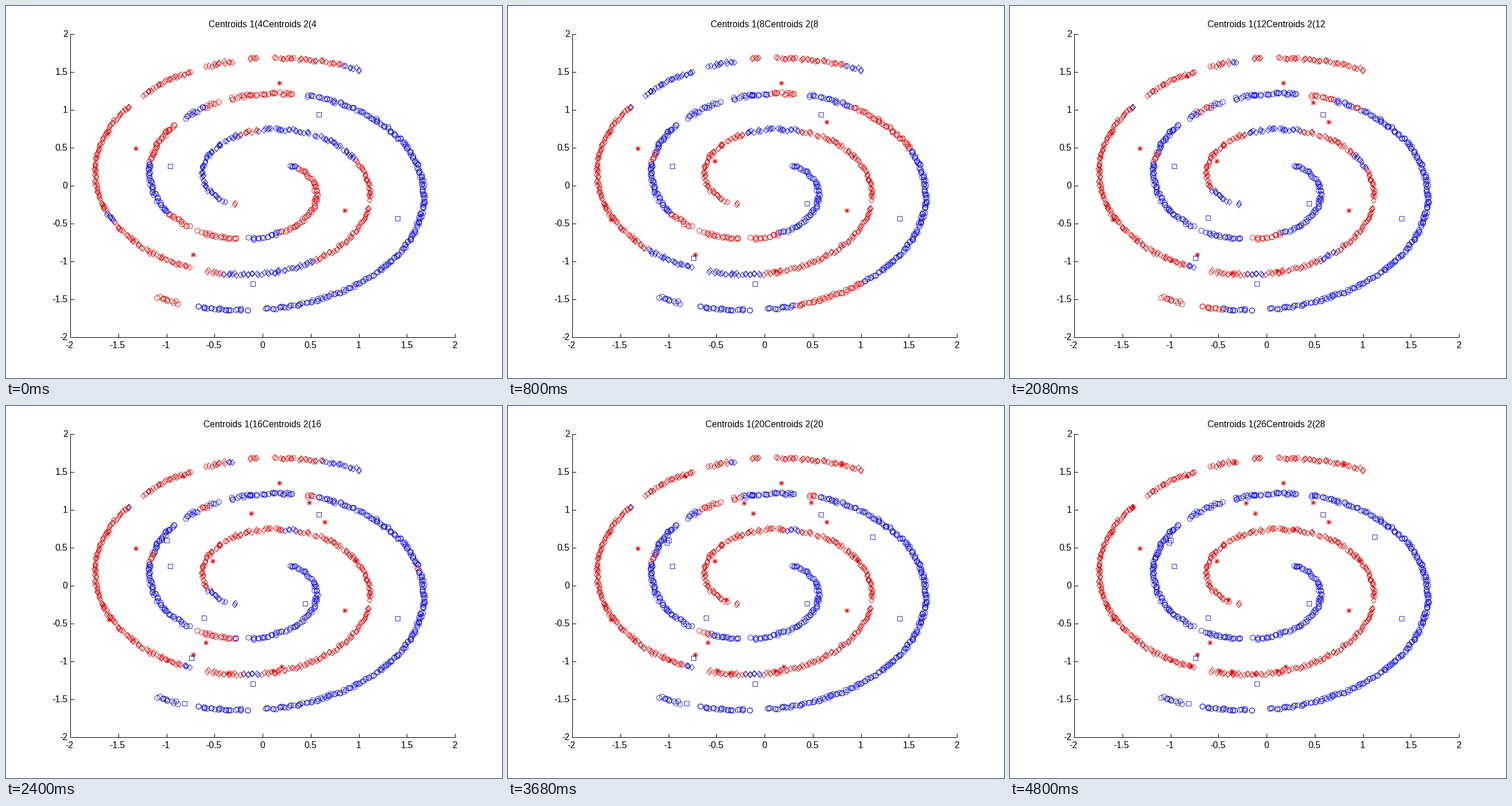
Write a matplotlib script that moves like this. It is 864 by 648 pixels and loops after 5.6 s.

```python
import numpy as np
import matplotlib.pyplot as plt
from matplotlib.animation import FuncAnimation

W, H, DPI = 864, 648, 100
PX = 72 / DPI                        # one pixel in points
LEFT, RIGHT, TOP, BOTTOM = 112, 782, 49, 577
SCALE = np.array([(RIGHT - LEFT) / 4, (BOTTOM - TOP) / 4])
CENTER = np.array([441.3, 309.7])    # middle of both spirals
TURN = np.array([30.2, 19.9])        # growth per radian
STEPS, PER_STEP = 7, 4
RED, BLUE = "#dc0000", "#0000dc"
FONT = dict(family="Liberation Sans", size=15.6 * PX, color="black")

# First centroids in pixels, four per step; later ones are computed
STARS = [
    (476, 134), (226, 248), (590, 356), (326, 433),
    (555, 202), (360, 270), (465, 461), (179, 372),
    (308, 122), (528, 168), (386, 465), (282, 443),
    (427, 187), (348, 412), (480, 454), (609, 269),
    (411, 169), (380, 337), (365, 461), (581, 101),
]
SQUARES = [
    (545, 189), (286, 279), (682, 370), (430, 484),
    (271, 233), (521, 344), (323, 439), (425, 156),
    (345, 369), (478, 152), (657, 210), (561, 503),
    (280, 234), (311, 518), (564, 165), (450, 402),
    (635, 228), (277, 238), (372, 402), (720, 285),
]

rng = np.random.default_rng(7)


def spiral(sign, start, end, count, gaps):
    """Noisy spiral whose point density grows with the angle."""
    grid = np.arange(count) + rng.uniform(-0.9, 0.9, count)
    grid = np.sort(grid.clip(0, count - 1)) / (count - 1)
    t = np.sqrt(start**2 + (end**2 - start**2) * grid)
    t = t[np.abs(t[:, None] - gaps).min(axis=1) > 0.045]
    xy = sign * t[:, None] * np.column_stack([np.cos(t), np.sin(t)])
    return CENTER + xy * TURN + rng.uniform(-2.2, 2.2, xy.shape)


def nearest(points, centroids):
    gap = (points[:, None] - centroids[None]) / SCALE
    return np.hypot(gap[..., 0], gap[..., 1]).min(axis=1)


def wrong_groups(points, wrong):
    """Means of misclassified runs, joined until few enough remain."""
    index = np.flatnonzero(wrong)
    if not len(index):
        return np.empty((0, 2))
    runs = np.split(index, np.flatnonzero(np.diff(index) > 1) + 1)
    while True:
        means = np.array([points[run].mean(axis=0) for run in runs])
        if len(runs) <= PER_STEP:
            return means
        gap = (means[:, None] - means[None]) / SCALE
        dist = np.hypot(gap[..., 0], gap[..., 1])
        np.fill_diagonal(dist, np.inf)
        a, b = sorted(np.unravel_index(dist.argmin(), dist.shape))
        runs[a] = np.concatenate([runs[a], runs.pop(b)])


circles = spiral(-1, 2.36, 11.53, 540,
                 [4.89, 5.47, 7.16, 7.58, 8.14, 11.01, 11.37])
diamonds = spiral(1, 2.22, 11.52, 480,
                  [2.31, 2.45, 2.6, 6.56, 8.3, 10.23, 10.66, 10.9, 11.03])


def is_red(points, stars, squares):
    return nearest(points, stars) < nearest(points, squares)


def train():
    history = []
    stars, squares = np.array(STARS, float), np.array(SQUARES, float)
    for step in range(STEPS):
        used = PER_STEP * (step + 1)
        if used > len(STARS):
            new_stars = wrong_groups(diamonds, ~is_red(diamonds, stars, squares))
            new_squares = wrong_groups(circles, is_red(circles, stars, squares))
            stars = np.vstack([stars, new_stars])
            squares = np.vstack([squares, new_squares])
            history.append((stars, squares))
        else:
            history.append((stars[:used], squares[:used]))
    return history


history = train()

fig = plt.figure(figsize=(W / DPI, H / DPI), dpi=DPI, facecolor="white")
ax = fig.add_axes([0, 0, 1, 1])
ax.set_xlim(0, W)
ax.set_ylim(H, 0)
ax.axis("off")


def rule(xs, ys):
    ax.plot(xs, ys, color="black", lw=PX, zorder=1)


rule([LEFT, LEFT], [TOP, BOTTOM])
rule([LEFT, RIGHT], [BOTTOM, BOTTOM])
for value in np.arange(-2, 2.1, 0.5):
    x = LEFT + (value + 2) * SCALE[0]
    y = BOTTOM - (value + 2) * SCALE[1]
    rule([x, x], [BOTTOM, BOTTOM - 6])
    rule([LEFT, LEFT + 6], [y, y])
    label = f"{value:g}"
    shift = 1.5 if value < 0 else 0
    ax.text(x - shift, 595.5, label, ha="center", va="baseline", **FONT)
    ax.text(107.5, y + 5.5, label, ha="right", va="baseline", **FONT)

title = ax.text(446.5, 37.5, "", ha="center", va="baseline", **FONT)

DIAMOND = [(0, 1), (0.8, 0), (0, -1), (-0.8, 0), (0, 1)]


def markers(shape, size, color):
    return ax.plot([], [], ls="none", marker=shape, ms=size * PX, mfc="none",
                   mec=color, mew=0.8 * PX, zorder=3)[0]


groups = [
    (circles, markers("o", 9, RED), markers("o", 9, BLUE)),
    (diamonds, markers(DIAMOND, 10.5, RED), markers(DIAMOND, 10.5, BLUE)),
]
star_marks = markers((8, 2, 0), 9, RED)
square_marks = markers("s", 8, BLUE)


def update(step):
    stars, squares = history[step]
    for points, red, blue in groups:
        mask = is_red(points, stars, squares)
        red.set_data(*points[mask].T)
        blue.set_data(*points[~mask].T)
    star_marks.set_data(*stars.T)
    square_marks.set_data(*squares.T)
    count = PER_STEP * (step + 1)
    title.set_text(f"Centroids 1({min(count, 26)}Centroids 2({count}")
    return []


anim = FuncAnimation(fig, update, frames=STEPS, interval=800, repeat=True,
                     repeat_delay=0, blit=False)
plt.show()
```
